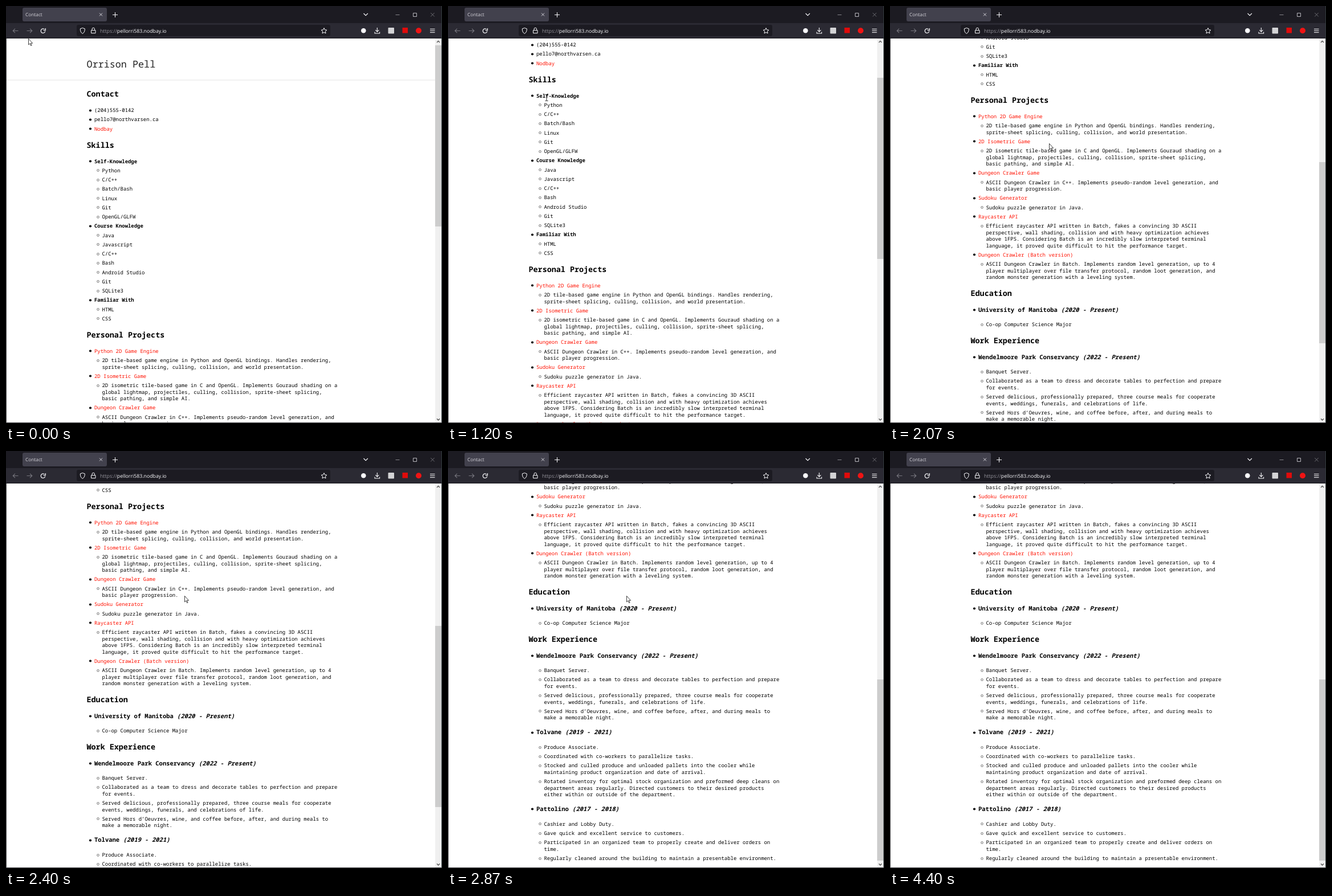
An HTML page with a canvas that plays this animation: 765 px wide and 732 px high, repeating every 4790 ms.

```html
<!DOCTYPE html>
<html lang="en">
<head>
<meta charset="utf-8">
<title>Contact</title>
<style>
html, body { margin: 0; width: 100%; height: 100%; overflow: hidden; background: #fff; }
canvas { display: block; }
</style>
</head>
<body>
<canvas id="stage" width="765" height="732"></canvas>
<script>
const ctx = document.getElementById('stage').getContext('2d');
const W = 765, H = 732, TOP = 57, LOOP = 4790, STEP = 1000 / 15;
const MONO = '"Noto Sans Mono", "DejaVu Sans Mono", monospace';
const SANS = '"Open Sans", "Noto Sans", sans-serif';
const BODY = 8.95, LIGHT = '#fbfbfe', DIM = '#77767e';

// # heading, = job with dates, ! bold item, * item, + link, - sub-item, > wrapped line
const PAGE = `# Contact
* (204)555-0142
* pello7@northvarsen.ca
+ Nodbay
# Skills
! Self-Knowledge
- Python
- C/C++
- Batch/Bash
- Linux
- Git
- OpenGL/GLFW
! Course Knowledge
- Java
- Javascript
- C/C++
- Bash
- Android Studio
- Git
- SQLite3
! Familiar With
- HTML
- CSS
# Personal Projects
+ Python 2D Game Engine
- 2D tile-based game engine in Python and OpenGL bindings. Handles rendering,
> sprite-sheet splicing, culling, collision, and world presentation.
+ 2D Isometric Game
- 2D isometric tile-based game in C and OpenGL. Implements Gouraud shading on a
> global lightmap, projectiles, culling, collision, sprite-sheet splicing,
> basic pathing, and simple AI.
+ Dungeon Crawler Game
- ASCII Dungeon Crawler in C++. Implements pseudo-random level generation, and
> basic player progression.
+ Sudoku Generator
- Sudoku puzzle generator in Java.
+ Raycaster API
- Efficient raycaster API written in Batch, fakes a convincing 3D ASCII
> perspective, wall shading, collision and with heavy optimization achieves
> above 1FPS. Considering Batch is an incredibly slow interpreted terminal
> language, it proved quite difficult to hit the performance target.
+ Dungeon Crawler (Batch version)
- ASCII Dungeon Crawler in Batch. Implements random level generation, up to 4
> player multiplayer over file transfer protocol, random loot generation, and
> random monster generation with a leveling system.
# Education
= University of Manitoba (2020 - Present)
- Co-op Computer Science Major
# Work Experience
= Wendelmoore Park Conservancy (2022 - Present)
- Banquet Server.
- Collaborated as a team to dress and decorate tables to perfection and prepare
> for events.
- Served delicious, professionally prepared, three course meals for cooperate
> events, weddings, funerals, and celebrations of life.
- Served Hors d’Oeuvres, wine, and coffee before, after, and during meals to
> make a memorable night.
= Tolvane (2019 - 2021)
- Produce Associate.
- Coordinated with co-workers to parallelize tasks.
- Stocked and culled produce and unloaded pallets into the cooler while
> maintaining product organization and date of arrival.
- Rotated inventory for optimal stock organization and preformed deep cleans on
> department areas regularly. Directed customers to their desired products
> either within or outside of the department.
= Pattolino (2017 - 2018)
- Cashier and Lobby Duty.
- Gave quick and excellent service to customers.
- Participated in an organized team to properly create and deliver orders on
> time.
- Regularly cleaned around the building to maintain a presentable environment.`;

function layout(source) {
  let y = 154.2, prev = '';
  return source.split('\n').map(line => {
    const kind = line[0];
    if (prev) {
      if (kind === '#' || prev === '#') y += 28.5;
      else if (kind === '=') y += 25.6;
      else if (prev === '=') y += 26;
      else y += kind === '>' ? 11.5 : 16.25;
    }
    prev = kind;
    return { kind, text: line.slice(2), y };
  });
}
const lines = layout(PAGE);

// [step, scroll offset]
const SCROLL = [[15, 0], [16, 31], [17, 75], [18, 115], [19, 150], [20, 178], [21, 192], [24, 192],
  [25, 221], [31, 412], [32, 438], [33, 456], [34, 468], [35, 476], [36, 480], [37, 480],
  [38, 509], [39, 553], [40, 595], [41, 630], [42, 657], [43, 669]];
// [step, x, y]
const POINTER = [[0, 39, 57], [8, 84, 93], [16, 173, 161], [25, 173, 161], [31, 279, 241],
  [34, 307, 251], [36, 313, 254], [58, 313, 254], [59, 316, 262], [60, 308, 302],
  [62, 240, 440], [64, 122, 630], [65, 41, 716], [66, 0, 760]];

function sample(keys, k, i) {
  const n = keys.findIndex(p => p[0] >= k);
  if (n < 0) return keys[keys.length - 1][i];
  if (n === 0) return keys[0][i];
  const a = keys[n - 1], b = keys[n];
  return a[i] + (b[i] - a[i]) * (k - a[0]) / (b[0] - a[0]);
}

function rect(x, y, w, h, color, r = 0) {
  ctx.fillStyle = color;
  ctx.beginPath();
  ctx.roundRect(x, y, w, h, r);
  ctx.fill();
}
function disc(x, y, r, color) {
  ctx.fillStyle = color;
  ctx.beginPath();
  ctx.arc(x, y, r, 0, 7);
  ctx.fill();
}
function ring(x, y, r, color, width, from = 0, to = Math.PI * 2) {
  ctx.strokeStyle = color;
  ctx.lineWidth = width;
  ctx.beginPath();
  ctx.arc(x, y, r, from, to);
  ctx.stroke();
}
function stroke(path, color, width = 1) {
  ctx.strokeStyle = color;
  ctx.lineWidth = width;
  ctx.stroke(new Path2D(path));
}
function write(text, x, y, font, color) {
  ctx.font = font;
  ctx.fillStyle = color;
  ctx.fillText(text, x, y);
  return x + ctx.measureText(text).width;
}

function drawLine({ kind, text, y }, scroll) {
  const cy = y - scroll;
  if (cy < TOP - 12 || cy > H + 12) return;
  const base = size => Math.round(y + size * 0.374) - scroll;
  const mid = Math.round(y) - scroll + 0.5;
  if (kind === '#') {
    const size = BODY * 1.5;
    write(text, 141.5, base(size), `bold ${size}px ${MONO}`, '#000');
    return;
  }
  if (kind === '-' || kind === '>') {
    if (kind === '-') ring(161.5, mid, 1.8, '#333', 0.7);
    write(text, 168.4, base(BODY), `500 ${BODY}px ${MONO}`, '#000');
    return;
  }
  disc(148, mid, 2.1, '#000');
  if (kind === '=') {
    const size = BODY * 1.176, cut = text.indexOf('(');
    const x = write(text.slice(0, cut), 155, base(size), `bold ${size}px ${MONO}`, '#000');
    write(text.slice(cut), x, base(size), `italic bold ${size}px ${MONO}`, '#000');
  } else {
    const weight = kind === '!' ? 'bold' : 500;
    write(text, 155, base(BODY), `${weight} ${BODY}px ${MONO}`, kind === '+' ? '#f10' : '#000');
  }
}

function drawPage(scroll) {
  rect(0, TOP, W, H - TOP, '#fff');
  write('Orrison Pell', 141.5, 108 - scroll, `${BODY * 1.875}px ${MONO}`, '#222');
  rect(1, 129.5 - scroll, 752, 1, '#e4e4e4');
  for (const line of lines) drawLine(line, scroll);

  rect(753, TOP, 11, H - TOP, '#f0f0f0');
  rect(753, 69 + Math.floor(scroll * 0.4977), 11, 318, '#cdcdcd');
  stroke('M756 64l2.5-2.5 2.5 2.5M756 724.5l2.5 2.5 2.5-2.5', '#505050', 1.3);
}

function drawTabs() {
  rect(0, 0, W, 30, '#1c1b22');
  rect(29, 3, 148, 24, '#42414d', 3);
  write('Contact', 34, 18, `8.3px ${SANS}`, '#d5d4da');
  stroke('M164 12.5l5 5m0-5l-5 5', '#d5d4da');
  stroke('M187 15.5h9M191.5 11v9', LIGHT);
  stroke('M627.5 13l3.7 3.7 3.7-3.7', LIGHT, 1.1);
  stroke('M683.5 15.5h7', '#85848a');
  stroke('M714.5 12.5h6v6h-6z', '#b8b7bd');
  stroke('M745.2 12l6.5 6.5m0-6.5l-6.5 6.5', '#77767c', 0.9);
}

function drawToolbar() {
  rect(0, 30, W, 27, '#2b2a33');
  rect(0, 56, W, 1, '#131218');
  stroke('M21.5 43.5h-9M16 39.8l-3.8 3.7 3.8 3.7M36.5 43.5h9M42 39.8l3.8 3.7-3.8 3.7', DIM, 1.1);
  ring(65, 43.7, 3.8, LIGHT, 1.2, 0.2, 5.4);
  stroke('M69.3 39v3.6h-3.6', LIGHT, 1.2);

  rect(124, 33, 445, 20, '#1c1b22', 3);
  stroke('M134.3 38.5l4 1.4c0 4.5-1 6.8-4 8.6c-3-1.8-4-4.1-4-8.6z', LIGHT);
  stroke('M149.5 42.7h7.5v5h-7.5zM151 42.5v-2a2.25 2.25 0 0 1 4.5 0v2', LIGHT);
  const font = `8.75px ${SANS}`;
  const x = write('https://', 165, 46.5, font, '#96959d');
  write('pellorri583.nodbay.io', x, 46.5, font, LIGHT);
  ctx.beginPath();
  for (let i = 0; i < 10; i++) {
    const a = i * Math.PI / 5 - Math.PI / 2, r = i % 2 ? 2.5 : 5.2;
    ctx.lineTo(558 + r * Math.cos(a), 43.8 + r * Math.sin(a));
  }
  ctx.closePath();
  ctx.strokeStyle = LIGHT;
  ctx.lineWidth = 1;
  ctx.stroke();

  disc(627.3, 43.3, 4.3, LIGHT);
  stroke('M651.3 38v7M648.3 42.2l3 3 3-3M647 45.5v2.5h8.6v-2.5', LIGHT, 1.1);
  rect(670.5, 38, 10.5, 10.5, '#d4d4d6', 1);
  rect(695.5, 38, 9.5, 9.5, '#e00b0b');
  disc(724, 43.3, 5, '#f01414');
  stroke('M744 40.5h8.5M744 43.5h8.5M744 46.5h8.5', LIGHT);
}

function drawPointer(x, y, beam) {
  ctx.save();
  ctx.translate(Math.round(x), Math.round(y));
  if (beam) {
    stroke('M-2.5-5.5h2l.5 .5 .5-.5h2M0-5v10M-2.5 5.5h2l.5-.5 .5 .5h2', '#222');
  } else {
    const arrow = new Path2D('M.5 .5v10.5l2.4-2.2 1.7 3.9 1.5-.7-1.7-3.7h3.2z');
    ctx.fillStyle = '#fff';
    ctx.fill(arrow);
    ctx.strokeStyle = '#111';
    ctx.lineWidth = 0.8;
    ctx.stroke(arrow);
  }
  ctx.restore();
}

function draw(k) {
  ctx.textRendering = 'geometricPrecision';
  drawPage(Math.round(sample(SCROLL, k, 1)));
  drawTabs();
  drawToolbar();
  rect(0, TOP, 1, H - TOP, '#4a4a4c');
  rect(764, 0, 1, H, '#30383a');
  rect(0, 731, W, 1, '#3c3c40');
  if (k < 66) drawPointer(sample(POINTER, k, 1), sample(POINTER, k, 2), k >= 15 && k <= 25);
}

const start = performance.now();
let shown = -1;
function tick() {
  const t = (performance.now() - start) % LOOP;
  const k = Math.floor(t / STEP + 0.06);
  if (k !== shown) draw(shown = k);
  requestAnimationFrame(tick);
}
tick();
</script>
</body>
</html>
```
